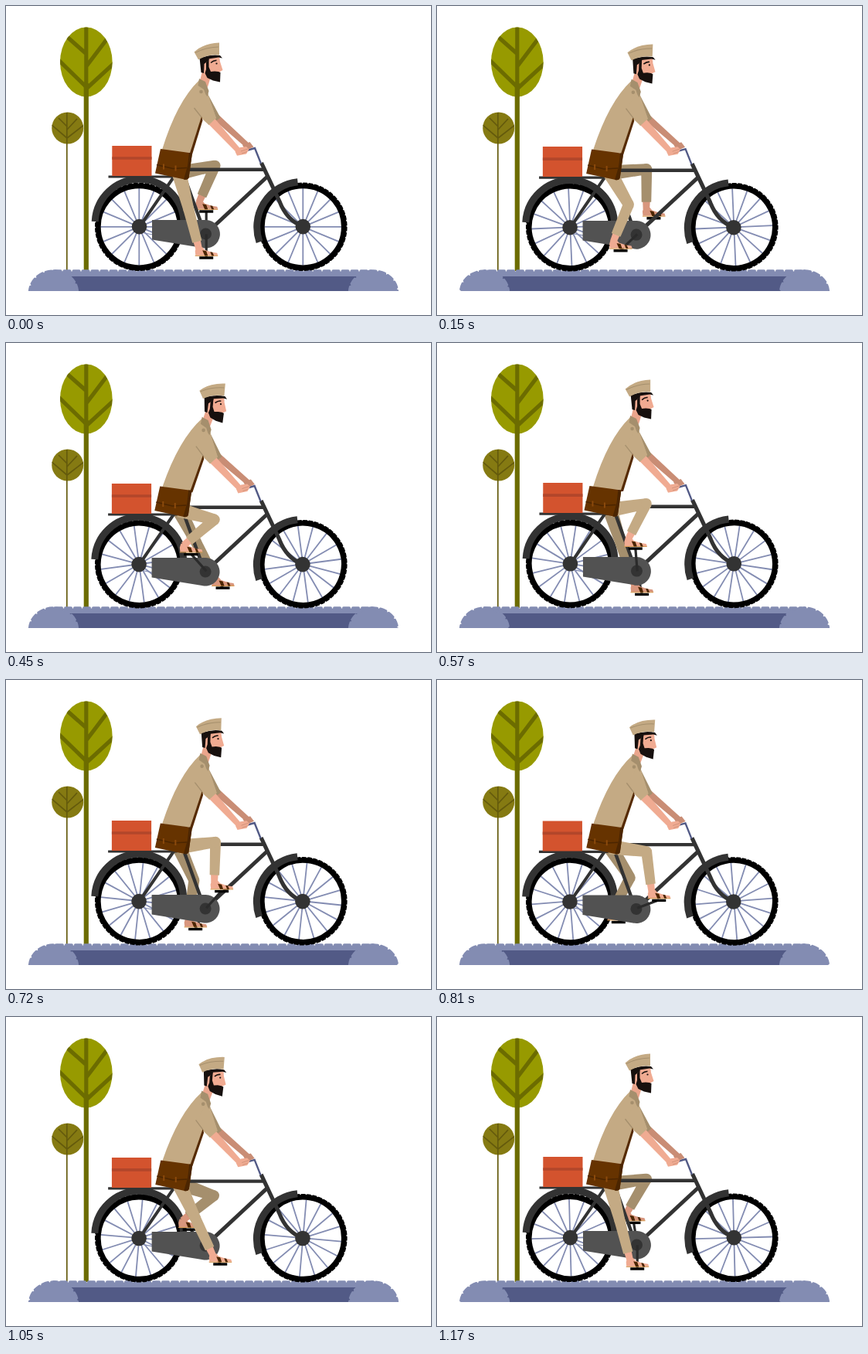
Write an HTML page that moves like this. It is 550x400 px and loops after 1200 ms.

```html
<!DOCTYPE html>
<html lang="en">
<head>
<meta charset="utf-8">
<title>Cyclist</title>
<style>
html, body { margin: 0; width: 100%; height: 100%; overflow: hidden; background: #fff; }
svg { display: block; width: 100vw; height: 100vh; }
</style>
</head>
<body>
<svg viewBox="0 0 550 400" xmlns="http://www.w3.org/2000/svg">
  <defs>
    <clipPath id="crown"><ellipse cx="103.8" cy="72.5" rx="33.8" ry="45"/></clipPath>
    <clipPath id="bush"><circle cx="79.7" cy="158" r="20.5"/></clipPath>
    <clipPath id="base"><rect width="550" height="369"/></clipPath>
  </defs>

  <g id="trees" fill="none">
    <circle cx="79.7" cy="158" r="20.5" fill="#857a12"/>
    <path d="M78.8 138V343" stroke="#645a0c" stroke-width="1.7"/>
    <path clip-path="url(#bush)" d="M68 145L79 156M92 146L79 160M59 154L79 171M101 154L79 171" stroke="#645a0c" stroke-width="1.7"/>
    <ellipse cx="103.8" cy="72.5" rx="33.8" ry="45" fill="#979a00"/>
    <path clip-path="url(#crown)" d="M78 39L104 62M132 41L104 78M68 70L104 105M140 74L104 107M103.8 27V118" stroke="#6c6c00" stroke-width="5.2"/>
    <path d="M103.8 100V343" stroke="#6c6c00" stroke-width="6.2"/>
  </g>

  <g id="road" clip-path="url(#base)">
    <path d="M62 343.5H475V351H62Z" fill="#838cb2"/>
    <path d="M70 350H466V369H70Z" fill="#525a86"/>
    <g fill="#838cb2">
      <ellipse cx="61.5" cy="370" rx="31" ry="27"/>
      <ellipse cx="475.5" cy="370" rx="31" ry="27"/>
    </g>
    <g id="bumps" fill="none" stroke="#838cb2" stroke-width="3.4" stroke-linecap="round" stroke-dasharray="7.6 4.4">
      <path d="M30.5 371A31 28 0 0 1 61.5 343H475.5A31 28 0 0 1 506.5 371"/>
      <path d="M61.5 343A31 28 0 0 1 92.5 371"/>
      <path d="M444.5 371A31 28 0 0 1 475.5 343"/>
    </g>
  </g>

  <g id="wheels"></g>

  <g id="fenders" fill="none" stroke="#333" stroke-width="9">
    <path d="M115.2 279A57.5 57.5 0 0 1 230 278"/>
    <path d="M377.5 227.8A58.7 58.7 0 0 0 328 305.5"/>
  </g>

  <g id="farLeg"></g>

  <g id="bike" fill="none" stroke="#333">
    <path d="M132.500 221H222" stroke-width="3.2"/>
    <path d="M218 220L173 285.500" stroke-width="4"/>
    <path d="M229 216L254 285" stroke-width="4.4"/>
    <path d="M228 211.700H335" stroke-width="4.4"/>
    <path d="M338 221L266 288" stroke-width="5"/>
    <path d="M330.500 203L354 253Q363 277 384 285.500" stroke-width="5.2"/>
    <path d="M174 293L190 296" stroke="#838cb2" stroke-width="1.2"/>
    <path d="M189 277H259A18.300 18.300 0 1 1 254 313L189 302.500Z" fill="#525252" stroke="none"/>
    <g fill="#333" stroke="none">
      <circle cx="172.500" cy="285.600" r="9.800"/>
      <circle cx="384.300" cy="285.600" r="9.800"/>
      <circle cx="258.500" cy="295" r="7.500"/>
    </g>
    <path d="M137.300 181H188.500V220H137.300Z" fill="#d3532e" stroke="none"/>
    <path d="M137.300 197H188.500" stroke="#b2462a" stroke-width="3.6"/>
    <path d="M330 204L322 184L306 188.500" stroke="#525a86" stroke-width="2.400"/>
  </g>

  <g id="farArm">
    <path id="farFore" fill="#c98d75"/>
    <path d="M306 180L315.500 176L320.500 182.500L310 187Z" fill="#c98d75"/>
  </g>
  <g id="nearLeg"></g>

  <g id="torso">
    <path d="M259 110L277.500 144.500L269 151L256 120Z" fill="#a58f6d"/>
    <g id="head">
      <path d="M254.500 82L266 88L261 105L251 97Z" fill="#eaa58c"/>
      <path d="M254 67L276 64L277 72L280.500 83L276 85.500L272 92L258 90L254 86Z" fill="#f0ab92"/>
      <path d="M250.500 67L263 65L262.500 70L259 73L256.500 75L256 87L252.500 86Z" fill="#17100e"/>
      <path d="M259 73L262.500 69L262.500 79L265 85L270 84.500L275 85L277.500 86L277 98.500L268 96.500L260.500 93L257.500 87L259 82Z" fill="#17100e"/>
      <path d="M265 73.500Q269 70 272.500 70.500" fill="none" stroke="#17100e" stroke-width="1.600"/>
      <circle cx="272.500" cy="74.500" r="1.100" fill="#17100e"/>
      <path d="M250 68.500Q263 62 277 64L280 67.500L275 66.500L262 68.500Z" fill="#17100e"/>
      <path d="M243.500 59.500Q255 48.500 276 47.500L276 63.500Q262 62 249 69.500Z" fill="#c4aa84"/>
      <path d="M245 60.500Q258 53.500 275 53" fill="none" stroke="#a58f6d" stroke-width="1"/>
    </g>
    <path d="M250 96Q221 124 202 186Q222 190 239 190L253 145L257 149L262.500 154L272 145L262 116L260 104Z" fill="#c4aa84"/>
    <path d="M253 143L254.500 148L241 192H237.500Z" fill="#552a02"/>
    <path d="M250 94L258 98L262.500 110L260 119L256 108L248.500 103Z" fill="#a58f6d"/>
    <circle cx="252.500" cy="111" r="2.300" fill="#a58f6d"/>
  </g>

  <g id="nearArm">
    <path id="nearFore" fill="#f0ab92"/>
    <path d="M296.500 188.500L303 183L311 182L314.500 185.500L311 191.500L299 193.800Z" fill="#f0ab92"/>
    <path d="M304 188L313 185M305 191L312 188.500" stroke="#c98d75" stroke-width=".8"/>
  </g>
  <g id="cuff">
    <path d="M246 130L256 112L263 120L272 145L262.500 154Z" fill="#c4aa84"/>
    <path d="M243.500 132L253 144" fill="none" stroke="#a58f6d" stroke-width="1.300"/>
  </g>

  <g id="bag">
    <path d="M200 185L241 190.500L236.500 222.500Q235 225.500 231 224.500L193 216.500Z" fill="#663300"/>
    <path d="M241 190.500L236.500 222.500Q235 225.500 230 224.500L235 207L237 190Z" fill="#4b2500"/>
    <path d="M195 205.500L216 210.500L234 209.500" fill="none" stroke="#4b2500" stroke-width="1.500"/>
    <path d="M204 204.500V211.500M219.500 206.500V213.500" stroke="#8b4a0c" stroke-width="2"/>
  </g>
</svg>
<script>
const FRAME = 30, COUNT = 40, BEAT = 39, HALF = BEAT / 2, PEAK = 13;
const HIP = [224, 216], CRANK = [259.2, 295.3], ARM = 30, THIGH = 47.5, SHIN = 52;
const $ = id => document.getElementById(id);
const set = (el, name, value) => el.setAttribute(name, value);
const smooth = x => x * x * (3 - 2 * x);
const bump = (x, mid, width) => Math.exp(-(((x - mid) / width) ** 2));
const mix = (a, b, k) => [a[0] + (b[0] - a[0]) * k, a[1] + (b[1] - a[1]) * k];

// Outline of a limb that narrows from width wa to wb.
function taper(a, b, wa, wb) {
  const dx = b[0] - a[0], dy = b[1] - a[1], len = Math.hypot(dx, dy) || 1;
  const nx = -dy / len / 2, ny = dx / len / 2;
  const pts = [[a, wa], [b, wb], [b, -wb], [a, -wa]]
    .map(([p, w]) => (p[0] + nx * w).toFixed(2) + " " + (p[1] + ny * w).toFixed(2));
  return "M" + pts.join("L") + "Z";
}

function turn(p, c, deg) {
  const r = deg * Math.PI / 180, x = p[0] - c[0], y = p[1] - c[1];
  return [c[0] + x * Math.cos(r) - y * Math.sin(r), c[1] + x * Math.sin(r) + y * Math.cos(r)];
}

function buildWheel(x) {
  let spokes = "";
  for (let i = 0; i < 16; i++) {
    const a = i * Math.PI / 8;
    spokes += `M0 0L${50 * Math.cos(a)} ${50 * Math.sin(a)}`;
  }
  return `<g transform="translate(${x} 285.800)"><g class="spin" fill="none">
    <path d="${spokes}" stroke="#838cb2" stroke-width="1.8"/>
    <circle r="53" stroke="#000" stroke-width="6.8"/>
    <circle r="56.3" stroke="#000" stroke-width="2" pathLength="48" stroke-dasharray=".78 .22"/>
  </g></g>`;
}

function buildLeg(id, cloth, skin) {
  $(id).innerHTML = `
    <path class="crank" stroke="#2b2b2b" stroke-width="3.2"/>
    <path class="ankle" fill="${skin}"/>
    <g class="foot">
      <rect x="-9" y="-1" width="18" height="3.4" fill="#000"/>
      <path d="M-14 -3L-14.500 -8L-13 -13L-5 -13L-2 -9.500L7 -6.500L14 -5.500L15 -2.500H-14Z" fill="${skin}"/>
      <path d="M-14.500 -2H15" stroke="#d79a55" stroke-width="1.2"/>
      <path d="M-5 -9L0 -8L2 -2H-2ZM5 -7L8 -6.500L10 -2H7Z" fill="#4b2500"/>
    </g>
    <path class="cloth" fill="${cloth}"/>
    <circle class="knee" r="7" fill="${cloth}"/>`;
}

function poseLeg(id, deg) {
  const q = sel => $(id).querySelector(sel), r = deg * Math.PI / 180;
  const pedal = [CRANK[0] - ARM * Math.sin(r), CRANK[1] + ARM * Math.cos(r)];
  const ankle = [pedal[0] - 9.5, pedal[1] - 11];
  const dx = ankle[0] - HIP[0], dy = ankle[1] - HIP[1], d = Math.hypot(dx, dy);
  const along = (THIGH * THIGH - SHIN * SHIN + d * d) / (2 * d);
  const out = Math.sqrt(Math.max(0, THIGH * THIGH - along * along));
  const knee = [HIP[0] + (dx * along + dy * out) / d, HIP[1] + (dy * along - dx * out) / d];
  const hem = mix(knee, ankle, 0.82);
  set(q(".crank"), "d", `M${CRANK}L${pedal}`);
  set(q(".ankle"), "d", taper(mix(knee, ankle, 0.72), ankle, 10, 8.5));
  set(q(".foot"), "transform", `translate(${pedal})`);
  set(q(".cloth"), "d", taper(HIP, knee, 19, 14) + taper(knee, hem, 14, 12.5));
  set(q(".knee"), "cx", knee[0]);
  set(q(".knee"), "cy", knee[1]);
}

$("wheels").innerHTML = buildWheel(172.3) + buildWheel(384.3);
buildLeg("farLeg", "#a58f6d", "#d8967d");
buildLeg("nearLeg", "#c4aa84", "#f0ab92");
const spins = document.querySelectorAll(".spin");

function draw(ms) {
  const f = Math.floor(ms / FRAME) % COUNT;
  const beat = f % HALF;
  const nod = smooth(beat < PEAK ? beat / PEAK : (HALF - beat) / (HALF - PEAK));
  const bob = Math.sin(Math.PI * beat / HALF);

  spins.forEach(el => set(el, "transform", `rotate(${4 * f})`));
  set($("bumps"), "stroke-dashoffset", 156 * f / COUNT);

  const sink = `translate(${-0.6 * bob} ${1.5 * bob})`;
  ["bike", "fenders"].forEach(id => set($(id), "transform", sink));
  set($("wheels"), "transform", `translate(0 ${0.7 * bob})`);

  poseLeg("nearLeg", 360 * f / BEAT);
  poseLeg("farLeg", 180 + 9 * f - 9 * bump(f, 26, 6));

  const lean = 2.6 * nod, pivot = [222, 200];
  const tilt = `translate(0 ${nod}) rotate(${lean} ${pivot})`;
  set($("torso"), "transform", tilt);
  set($("cuff"), "transform", tilt);
  set($("head"), "transform", `translate(0 ${1.4 * nod}) rotate(${4 * nod} 256 96)`);

  const hand = [1.8 * nod, 0.8 * nod];
  const elbow = p => turn(p, pivot, lean).map((v, i) => v + (i ? nod : 0) - hand[i]);
  set($("nearFore"), "d", taper(elbow([264, 147]), [302, 188.5], 11, 7));
  set($("farFore"), "d", taper(elbow([272, 144]), [313, 181], 9, 7));
  ["nearArm", "farArm"].forEach(id => set($(id), "transform", `translate(${hand})`));

  const push = bump(f, 18.5, 3.6);
  set($("bag"), "transform", `translate(${-2.6 * push + 0.4 * nod} ${0.8 * bob})`);
}

function loop(now) {
  draw(Math.max(0, now - start));
  requestAnimationFrame(loop);
}
const start = performance.now();
draw(0);
requestAnimationFrame(loop);
</script>
</body>
</html>
```
